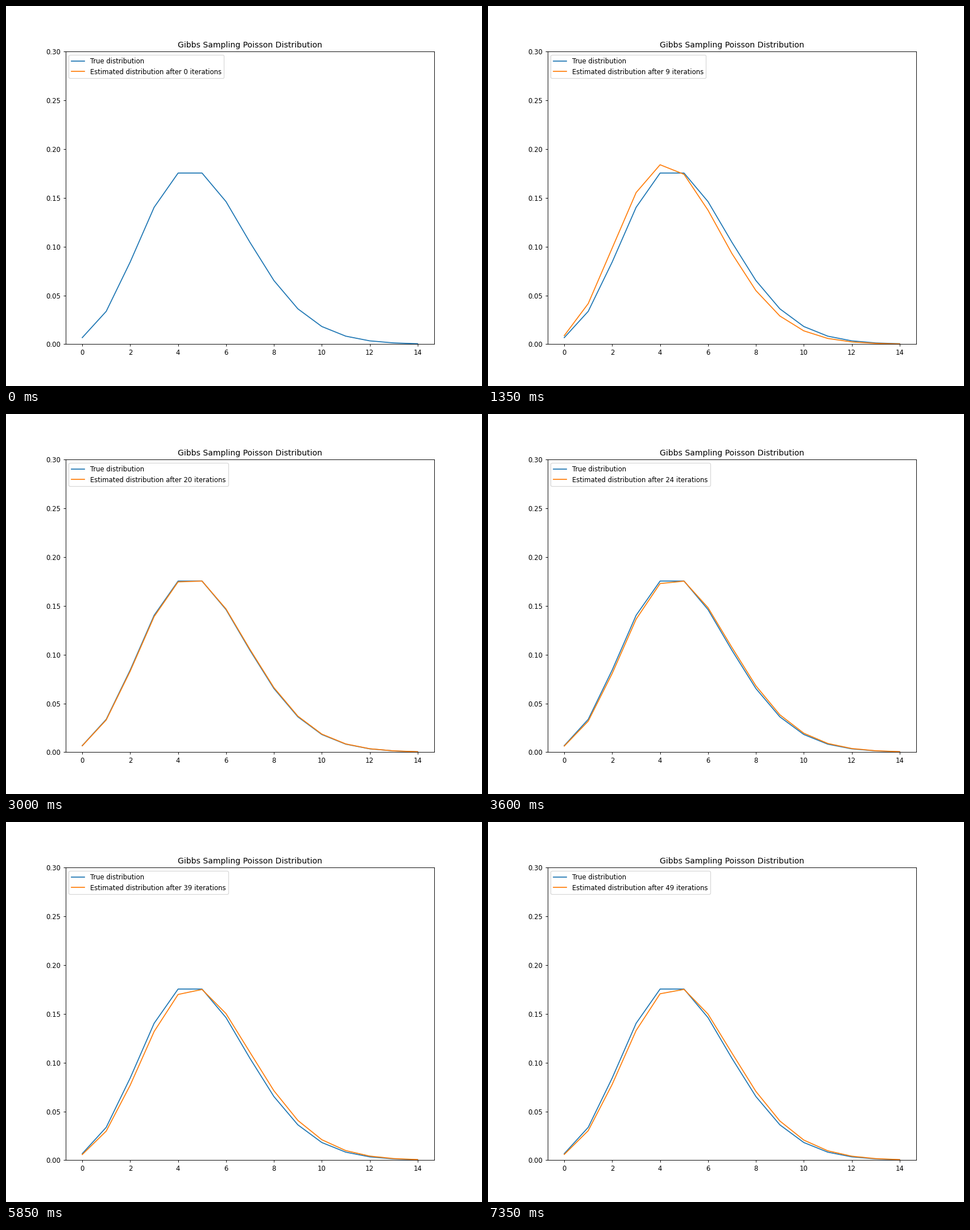
Write a matplotlib script that moves like this. It is 837 px wide and 669 px high and loops after 7500 ms.

```python
from math import factorial

import matplotlib.pyplot as plt
import numpy as np
from matplotlib.animation import FuncAnimation

W, H, DPI = 837, 669, 83.7
FRAMES, INTERVAL = 50, 150
RATE = 5
EPS = 1e-6  # keeps the pixel size from rounding down

plt.rcParams["font.family"] = "DejaVu Sans"

k = np.arange(15)
k_fact = np.array([factorial(n) for n in k], dtype=float)

# Running sum of the sampled rates: starts at 1, then grows by about 5.2 a step
SUM_AT = [1, 9, 16, 24, 32, 39, 49]
RATE_SUM = [1, 42.6, 79.25, 121.7, 163.9, 200.9, 251.5]


def poisson(rate):
    return rate ** k * np.exp(-rate) / k_fact


def mean_rate(n):
    """Mean of the first n sampled rates; undefined before the first."""
    return np.interp(n, SUM_AT, RATE_SUM) / n if n else np.nan


fig, ax = plt.subplots(figsize=((W + EPS) / DPI, (H + EPS) / DPI), dpi=DPI)
ax.plot(k, poisson(RATE), color="C0", label="True distribution")
(estimate,) = ax.plot(k, np.full(len(k), np.nan), color="C1")
ax.set_title("Gibbs Sampling Poisson Distribution")
ax.set_xlim(-0.7, 14.7)
ax.set_ylim(0, 0.3)


def update(n):
    rate = mean_rate(n)
    estimate.set_ydata(poisson(rate) if n else np.full(len(k), np.nan))
    estimate.set_label(f"Estimated distribution after {n} iterations")
    legend = ax.legend(loc="upper left")
    return estimate, legend


anim = FuncAnimation(fig, update, frames=FRAMES, interval=INTERVAL,
                     repeat=True, repeat_delay=0, blit=False)
plt.show()
```
